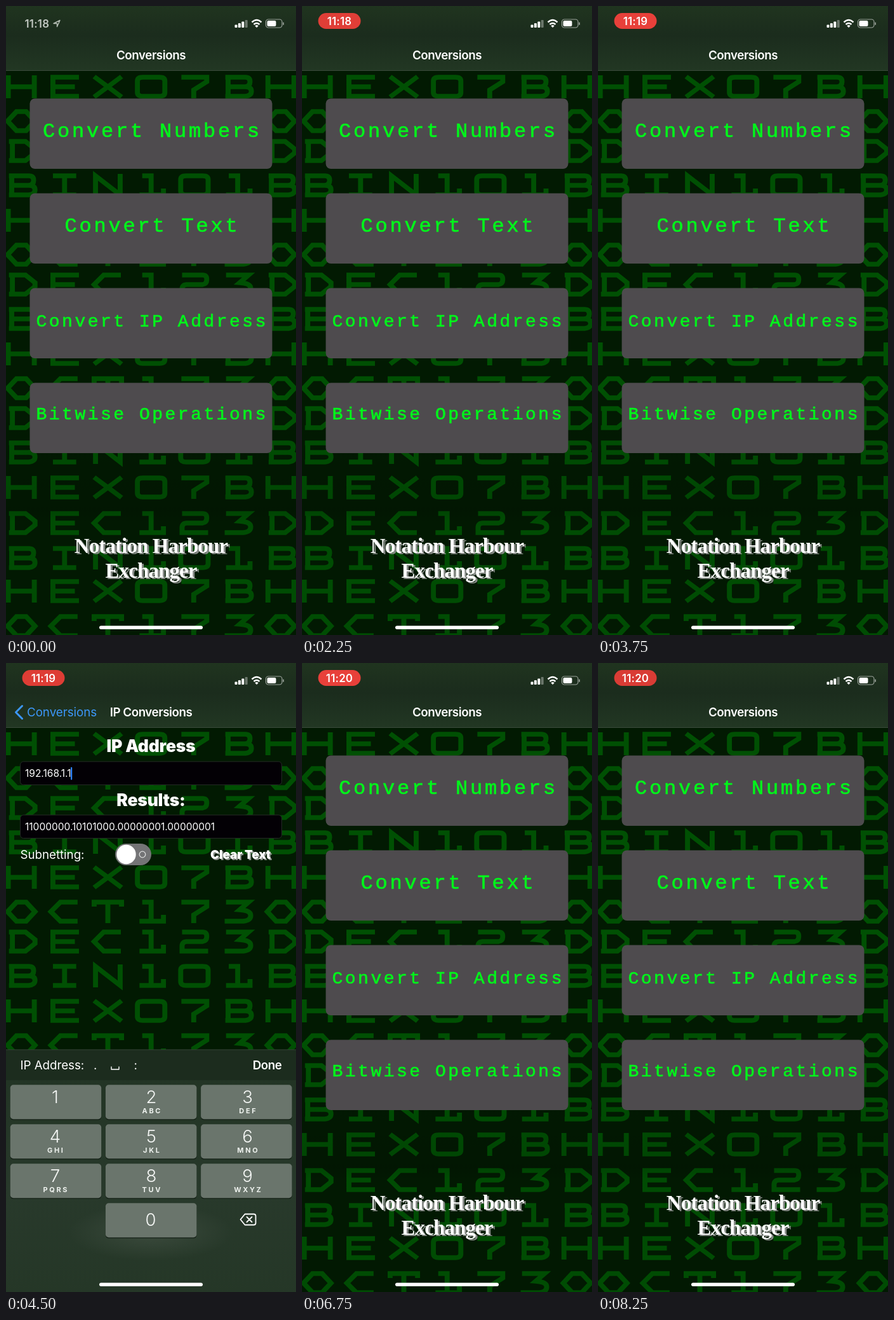
Recreate the animation shown at these times as an HTML page. Size 457x989 px, loop 9000 ms.

```html
<!DOCTYPE html>
<html lang="en">
<head>
<meta charset="utf-8">
<title>Number conversions demo</title>
<style>
html, body { margin: 0; width: 100%; height: 100%; overflow: hidden; background: #021502; }
svg { display: block; width: 100%; height: 100%; }
text { font-family: Inter, Roboto, sans-serif; fill: #fff; white-space: pre; }
.body { font-size: 18.8px; letter-spacing: -.003em; }
.nav { font-size: 18.8px; font-weight: 600; letter-spacing: -.025em; }
.head { font-size: 26.5px; font-weight: 900; letter-spacing: -.01em; }
.clear { font-size: 18.8px; font-weight: 900; letter-spacing: -.003em; }
.value { font-size: 15.5px; }
.time { font-size: 16.8px; font-weight: 600; letter-spacing: .015em; }
.key { font-size: 27.6px; font-weight: 350; fill: #f4f6f4; }
.sub { font-size: 11px; font-weight: 700; letter-spacing: 2.6px; fill: #eef2ee; }
.small { font-size: 17.6px; }
.seg { font-size: 14px; font-weight: 500; }
.menu { font-family: "Liberation Mono", monospace; fill: #00f51b; stroke: #00f51b; stroke-width: .7; }
.brand { font-family: "Liberation Serif", serif; font-weight: 700; font-size: 33px; letter-spacing: -.9px; }
.mid { text-anchor: middle; }
.end { text-anchor: end; }
.link { fill: #3c97f8; }
.line { fill: none; stroke: #fff; stroke-width: 2; stroke-linecap: round; stroke-linejoin: round; }
</style>
</head>
<body>
<svg id="stage" viewBox="0 0 457 989" preserveAspectRatio="none">
  <defs>
    <linearGradient id="bar" x2="0" y2="1">
      <stop offset="0" stop-color="#20341f"/><stop offset=".45" stop-color="#1b2c1d"/><stop offset="1" stop-color="#223723"/>
    </linearGradient>
    <linearGradient id="board" x2="0" y2="1">
      <stop offset="0" stop-color="#213323"/><stop offset=".6" stop-color="#28392b"/><stop offset="1" stop-color="#253727"/>
    </linearGradient>
    <linearGradient id="shade" x2="0" y2="1">
      <stop offset=".6" stop-color="#000" stop-opacity="0"/>
      <stop offset=".78" stop-color="#000" stop-opacity=".14"/><stop offset=".8" stop-color="#000" stop-opacity=".05"/>
      <stop offset="1" stop-color="#000" stop-opacity=".05"/>
    </linearGradient>
    <radialGradient id="glow">
      <stop offset="0" stop-color="#7d857c" stop-opacity=".24"/><stop offset="1" stop-color="#7d857c" stop-opacity="0"/>
    </radialGradient>
    <clipPath id="list"><rect x="20" y="405" width="415" height="203"/></clipPath>
  </defs>
</svg>
<script>
const STEP = 750, MID = 228.5;
const stage = document.getElementById('stage');

const rect = (x, y, w, h, r, fill, more = '') =>
  `<rect x="${x}" y="${y}" width="${w}" height="${h}" rx="${r}" fill="${fill}" ${more}/>`;
const text = (x, y, cls, str, more = '') =>
  `<text x="${x}" y="${y}" class="${cls}" ${more}>${str.replace(/&/g, '&amp;').replace(/</g, '&lt;')}</text>`;
const line = (d, more = '') => `<path class="line" d="${d}" ${more}/>`;

// Wallpaper letters on a 40 x 30 grid
const GLYPHS = {
  H: 'M1 -3V33M39 -3V33M1 15H39', E: 'M41 0H3V30H41M3 15H35', X: 'M0 -1L40 31M40 -1L0 31',
  0: 'M8 0H32Q40 0 40 6V24Q40 30 32 30H8Q0 30 0 24V6Q0 0 8 0Z', 7: 'M1 0H38V7L19 20V33',
  B: 'M2 0H31Q38 0 38 7T31 15H8M31 15Q40 15 40 22T31 30H2M6 0V30', O: 'M13 0H27L40 15L27 30H13L0 15Z',
  C: 'M39 0H14L0 15L14 30H39', T: 'M0 7V0H40V7M20 0V33', 1: 'M7 0H20V30M3 30H38V20',
  3: 'M3 0H36L23 12Q39 13 39 21T28 30H1', D: 'M2 0H26L40 12V18L26 30H2M7 0V30',
  2: 'M2 0H32Q38 0 38 7T32 15H9Q2 15 2 22V30H40', I: 'M3 0H37M20 0V30M3 30H37', N: 'M2 33V0L38 30V-3'
};
const WORDS = ['HEX07BH', 'OCT173O', 'DEC123D', 'BIN101B'];
const OFFSETS = [0, 54, 101, 155];

function wallpaper() {
  const rows = [];
  for (let i = 0; i < 13; i++) rows.push([WORDS[i % 4], 127 + 210 * (i >> 2) + OFFSETS[i % 4]]);
  [813, 868, 920, 975].forEach((y, i) => rows.push([WORDS[(i + 2) % 4], y]));
  const letters = rows.map(([word, y]) => [...word].map((c, i) =>
    `<path d="${GLYPHS[c]}" transform="translate(${2.5 + 68.2 * i} ${y - 15}) scale(1.08 1)"/>`).join('')).join('');
  return rect(0, 0, 457, 989, 0, '#021a02') +
    `<g fill="none" stroke="#005003" stroke-width="7.3">${letters}</g>` +
    rect(0, 102, 457, 887, 0, 'url(#shade)');
}

function header(title, back, time, pill) {
  let s = rect(0, 0, 457, 102, 0, 'url(#bar)') + rect(0, 101, 457, 1, 0, '#3b4a3b');
  if (pill) s += rect(25.5, 11, 67, 25, 12.5, pill) + text(59, 29.5, 'time mid', time);
  else s += text(29.5, 33.5, 'time', time, 'style="fill:#c3c9c3"') +
    line('M75 27.5L85 22.5L80.5 32.5V27.5Z', 'style="stroke:#b4bcb4;stroke-width:1.4"');
  for (let i = 0; i < 4; i++)
    s += rect(360.5 + 5.4 * i, 29.6 - 2.5 * i, 4, 4.4 + 2.5 * i, 1, '#fff', i === 3 ? 'opacity=".35"' : '');
  s += line('M387.5 25.5Q395 18.5 402.5 25.5M390.5 29Q395 25 399.5 29', 'style="stroke-width:2.4;stroke-linecap:butt"') +
    '<path d="M392.3 31.2Q395 29 397.7 31.2L395 34Z" fill="#fff"/>' +
    rect(409.5, 21, 25.5, 13, 4, 'none', 'stroke="#9da59d" stroke-width="1.2"') +
    rect(411.5, 23, 14, 9, 2, '#fff') + rect(436.4, 25.5, 1.6, 4.5, 1, '#9da59d');
  if (back) s += line('M25.5 67.5L15.5 77.5L25.5 87.5', 'style="stroke:#3c97f8;stroke-width:3"') + text(33, 84, 'body link', back);
  return s + text(MID, 84, 'nav mid', title);
}

const home = () => rect(147, 974.5, 163, 5.5, 2.75, '#fff');
const head = (str, y, x = MID) => text(x, y + 9.5, 'head mid', str);
const field = (str, y, caret = '') =>
  rect(22.5, y + .5, 412, 36.5, 5, '#030005', 'stroke="#242a25"') +
  text(30, y + 24.8, 'value', str, caret && `data-caret="${caret}"`);
const clearText = y => text(324, y + 8.5, 'clear', 'Clear Text', 'style="fill:#8b918b"') +
  text(322, y + 6.8, 'clear', 'Clear Text');
const toggle = (label, y, on) => text(22.5, y + 6.5, 'body', label) +
  rect(172, y - 17, 57, 34, 17, on ? '#33d65c' : '#747476') +
  `<circle cx="${on ? 211 : 189.5}" cy="${y}" r="15.2" fill="#fff"/>` +
  (on ? rect(184.5, y - 5, 1.5, 10, 0, '#fff')
      : `<circle cx="215" cy="${y}" r="4.8" fill="none" stroke="#ddd" stroke-width="1.3"/>`);

const keycap = (x, y, w, h, fill = '#6a756c') =>
  rect(x, y + 1.3, w, h, 5, '#152017') + rect(x, y, w, h, 5, fill);
const eraser = (x, y) => line(`M${x - 12} ${y}L${x - 5} ${y - 8.5}H${x + 9}Q${x + 12} ${y - 8.5} ${x + 12} ${y - 5.5}` +
  `V${y + 5.5}Q${x + 12} ${y + 8.5} ${x + 9} ${y + 8.5}H${x - 5}ZM${x - 2} ${y - 4}l8 8m0 -8l-8 8`, 'style="stroke-width:1.8"');

const toolbar = label => rect(0, 608, 457, 381, 0, 'url(#board)') + rect(0, 608, 457, 48, 0, '#1c2c1e') +
  rect(0, 607.5, 457, 1, 0, '#344236') + text(22.5, 639, 'body', label) + text(434.5, 639, 'nav end', 'Done');

const SUBS = ['', 'ABC', 'DEF', 'GHI', 'JKL', 'MNO', 'PQRS', 'TUV', 'WXYZ'];
function keypad(label) {
  let s = toolbar(label) + '<ellipse cx="228" cy="895" rx="130" ry="45" fill="url(#glow)"/>';
  SUBS.forEach((sub, i) => {
    const col = i % 3, y = 663.3 + 62 * Math.floor(i / 3), x = 77.5 + 151.5 * col;
    s += keycap(6.7 + 150.2 * col, y, 143.5, 54) + text(x, y + 28.7, 'key mid', `${i + 1}`) +
      text(x + 1.3, y + 44.7, 'sub mid', sub);
  });
  return s + keycap(156.9, 849.3, 143.5, 54) + text(228, 885, 'key mid', '0') + eraser(381.5, 875) + home();
}

function letterKeys(label) {
  let s = toolbar(label);
  [['qwertyuiop', 4.5, 666], ['asdfghjkl', 27.5, 728], ['zxcvbnm', 73.5, 790]].forEach(([row, x0, y]) =>
    [...row].forEach((c, i) => {
      const x = x0 + 45.4 * i;
      s += keycap(x, y, 39.5, 49.5) + text(x + 19.8, y + 32.5, 'key mid', c);
    }));
  return s + keycap(4.5, 790, 49.5, 49.5, '#435046') + keycap(402.5, 790, 50, 49.5, '#435046') +
    line('M29.5 805L19.5 815.5H25V823.5H34V815.5H39.5Z', 'style="stroke-width:1.8"') + eraser(427.5, 814.5) +
    keycap(4.5, 851, 108, 49.5, '#435046') + text(58.5, 882, 'small mid', '123') +
    keycap(119, 851, 220, 49.5) + text(229, 881, 'small mid', 'space') +
    keycap(345.5, 851, 107, 49.5, '#047bfd') + text(399, 881, 'small mid', 'done') +
    rect(407, 927, 10, 21, 5, '#fff') + line('M402 941V944Q402 953 412 953T422 944V941M412 953V958M405 958.5H419') + home();
}

function menu(time, pill) {
  const item = (str, i, size, gap, base) => rect(37.5, 145.5 + 149 * i, 382, 110.5, 8, '#4e4b4e') +
    text(MID + gap / 2, base, 'menu mid', str, `font-size="${size}" letter-spacing="${gap}"`);
  const brand = (str, y) => text(MID + 3, y + 2, 'brand mid', str, 'style="fill:#858985"') + text(MID, y, 'brand mid', str);
  return header('Conversions', '', time, pill) +
    item('Convert Numbers', 0, 32, 3.8, 206) + item('Convert Text', 1, 32, 3.8, 355) +
    item('Convert IP Address', 2, 28, 3.5, 504) + item('Bitwise Operations', 3, 28, 3.5, 649.5) +
    brand('Notation Harbour', 860) + brand('Exchanger', 899) + home();
}

const BLUE = '#2f86ff';
function numbers(signed, vals, pill) {
  const names = ['Decimal:', 'Binary:', 'Hexadecimal:', 'Octal:'];
  return header(`${signed ? 'Signed' : 'Unsigned'} Integer Conversions`, 'Back', '11:18', pill) +
    names.map((n, i) => head(n, 127 + 84.5 * i) + field(vals[i], Math.round(151 + 84.2 * i), i ? '' : BLUE)).join('') +
    toggle('Signed Integer:', 468, signed) + clearText(467) + keypad('Decimal:');
}

const strings = pill => header('String Conversions', 'Conversions', '11:19', pill) +
  head('String:', 127) + field('Demo', 151, '#12365f') + head('Decimal:', 212) + field('68 101 109 111', 235) +
  head('Binary:', 297) + field('1000100 1100101 1101101 1101111', 321) +
  head('Hexadecimal:', 381) + field('44 65 6D 6F', 404) + clearText(467) + letterKeys('String:');

function address(sep, pill) {
  return header('IP Conversions', 'Conversions', '11:19', pill) +
    head('IP Address', 130) + field(['192', '168', '1', '1'].join(sep), 154.5, BLUE) +
    head('Results:', 215) + field(['11000000', '10101000', '00000001', '00000001'].join(sep), 238.5) +
    toggle('Subnetting:', 301, false) + clearText(301) + keypad('IP Address:') +
    text(138, 639, 'body', '.') + line('M166 635V639H178V635', 'style="stroke-width:1.4"') + text(201.5, 639, 'body', ':');
}

function subnets(pill) {
  const rows = ['IP Address: Class C', '#    Subnet ID',
    '0: 11000000.10101000.00000001.00000000 (192.168.1.0)', '\tBroadcast ID: 192.168.1.63',
    '\tHost Range: 192.168.1.1 - 192.168.1.62',
    '1: 11000000.10101000.00000001.01000000 (192.168.1.64)', '\tBroadcast ID: 192.168.1.127',
    '\tHost Range: 192.168.1.65 - 192.168.1.126', 'Bits Stolen: 1'];
  return header('IP Conversions', 'Conversions', '11:19', pill) +
    head('IP Address', 130) + field('192:168:1:1', 154.5) + head('Subnet Mask:', 215) + field('255.255.255.128', 238.5) +
    toggle('Subnetting:', 301, true) + clearText(301) + head('How Many Subnets', 343, 268.5) + field('2', 363, BLUE) +
    '<g clip-path="url(#list)">' + rows.map((r, i) =>
      text(r[0] === '\t' ? 84 : 22.5, 427 + 22.35 * i, 'body', r.trim())).join('') + '</g>' + keypad('IP Address:');
}

function bitwise(pill) {
  const bits = n => `(${n}) - ${n.toString(2).padStart(32, '0')}`;
  const ops = ['&', '|', '^', '~', '<<', '>>'];
  return header('Bitwise Operations', 'Conversions', '11:20', pill) +
    head('Integer One:', 127) + field('52', 151) + head('Integer Two:', 212) + field('2', 235, BLUE) +
    rect(22, 282, 413, 32.5, 8, '#4cb563') + rect(24, 284.5, 63.5, 27.5, 7, '#86c78f') +
    ops.map((op, i) => text(56 + 69 * i, 303.5, 'seg mid', op) +
      (i > 1 ? line(`M${21.5 + 69 * i} 290V307`, 'style="stroke:#3b9c50;stroke-width:1;stroke-dasharray:2 3"') : '')).join('') +
    head('Results:', 337) + field(bits(52), 360) + field(bits(2), 406.5) +
    head('Bitwise AND', 467) + field(bits(52 & 2), 490) + clearText(553) + keypad('Bitwise:');
}

const shots = [
  menu('11:18', ''),
  numbers(false, ['25', '11001', '19', '31'], '#de3d35'),
  numbers(true, ['-25', '11100111', 'E7', '347'], '#e8403a'),
  menu('11:18', '#e03e37'),
  strings('#fd453e'),
  menu('11:19', '#e8403a'),
  address('.', '#de3d35'),
  address(':', '#e8403a'),
  subnets('#e13e37'),
  menu('11:20', '#e8403a'),
  bitwise('#ef423b'),
  menu('11:20', '#d93c35')
];
stage.insertAdjacentHTML('beforeend', wallpaper() + shots.map(s => `<g class="shot">${s}</g>`).join(''));

// Carets sit right after their measured text
for (const el of stage.querySelectorAll('[data-caret]')) {
  const x = 30 + el.getComputedTextLength();
  el.insertAdjacentHTML('afterend', rect(x - .5, el.getAttribute('y') - 15.5, 2.2, 20, 1, el.dataset.caret));
}

const groups = [...stage.querySelectorAll('.shot')];
function draw(t) {
  const now = Math.floor(t / STEP) % groups.length;
  groups.forEach((g, i) => g.setAttribute('display', i === now ? 'inline' : 'none'));
}

const start = performance.now();
function tick() {
  draw(performance.now() - start);
  requestAnimationFrame(tick);
}
tick();
</script>
</body>
</html>
```
